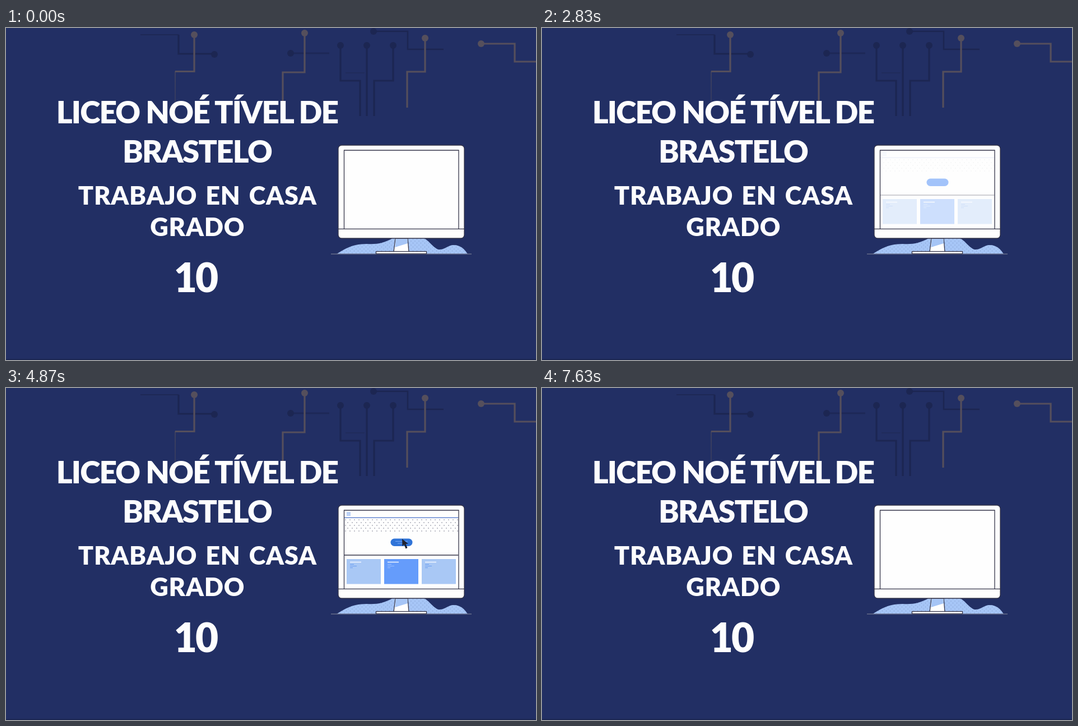
Recreate the animation shown at these times as an HTML page. Size 946x592 px, loop 7.66 s.

```html
<!DOCTYPE html>
<html lang="es">
<head>
<meta charset="utf-8">
<title>Trabajo en casa</title>
<style>
  html, body { margin: 0; width: 100%; height: 100%; overflow: hidden; background: #222f64; }
  svg { display: block; width: 100vw; height: 100vh; }
  text { font-family: Lato, "Open Sans", sans-serif; font-weight: 900; fill: #fdfdfe; text-anchor: middle; }
  .title { font-size: 55px; letter-spacing: -1.8px; }
  .sub { font-size: 45px; letter-spacing: .8px; word-spacing: 4px; }
  .grade { font-size: 71px; letter-spacing: -3px; }
  .gold { stroke: #554f5c; stroke-width: 3.2; fill: none; }
  .dark { stroke: #1c2652; stroke-width: 3.2; fill: none; }
  .ink { stroke: #36364a; stroke-width: 1.3; }
</style>
</head>
<body>
<svg viewBox="0 0 946 592">
  <defs>
    <clipPath id="screen"><rect x="603.6" y="218.6" width="203.8" height="139"/></clipPath>
    <pattern id="heroDots" width="8" height="10" patternUnits="userSpaceOnUse" x="604" y="233">
      <circle cx="2" cy="2" r=".7" fill="#50536a"/><circle cx="6" cy="7" r=".7" fill="#50536a"/>
    </pattern>
    <pattern id="hillDots" width="7" height="7" patternUnits="userSpaceOnUse">
      <circle cx="2" cy="2" r=".6" fill="#6f88b8"/><circle cx="5.5" cy="5.5" r=".6" fill="#6f88b8"/>
    </pattern>
    <linearGradient id="fade" gradientUnits="userSpaceOnUse" x1="0" y1="78" x2="0" y2="150">
      <stop offset="0" stop-color="#554f5c"/><stop offset="1" stop-color="#3d4060"/>
    </linearGradient>
    <path id="hills" d="M590 403C602 396 616 385 644 385C662 386 674 384 692 374H744C755 378 761 391 772 395C783 396 789 387 799 387C812 387 819 395 824 403Z"/>
  </defs>
  <rect width="946" height="592" fill="#222f64"/>
  <rect y="590" width="946" height="2" fill="#1b2652"/>
  <g id="circuit"></g>

  <text class="title" x="341" y="170">LICEO NOÉ TÍVEL DE</text>
  <text class="title" x="341" y="240">BRASTELO</text>
  <text class="sub" x="341.700" y="315">TRABAJO EN CASA</text>
  <text class="sub" x="341.700" y="371">GRADO</text>
  <text class="grade" x="338" y="471">10</text>

  <use href="#hills" fill="#a6c5f6"/>
  <use href="#hills" fill="url(#hillDots)"/>
  <path d="M580 403H831" stroke="#656b88" stroke-width="1.4"/>
  <path class="ink" d="M695 375L692 399H719L717 375Z" fill="#fff"/>
  <path d="M695.500 376H716.500L717 384L694.300 391Z" fill="#a6c5f6"/>
  <rect class="ink" x="660.500" y="398.500" width="90" height="4" fill="#fff"/>
  <rect class="ink" x="593" y="209" width="225" height="166" rx="6" fill="#fefefe"/>

  <g clip-path="url(#screen)">
    <g id="page">
      <g id="header">
        <path d="M608 222H615M608 224.500H615M608 227H615" stroke="#5f92ec" stroke-width="1.2"/>
        <path d="M603 231.300H808" stroke="#6688d2" stroke-width="1.4"/>
        <rect x="604" y="233" width="203" height="25" fill="url(#heroDots)"/>
      </g>
      <g id="body">
        <path class="ink" d="M603 298H808"/>
        <g id="cards"></g>
      </g>
      <g id="button">
        <rect id="pill" x="686.500" y="268.500" width="39" height="13.500" rx="6.700"/>
        <path id="label" d="M695 273.500H717M699 277H713" stroke="#79a8f3" stroke-width="1"/>
      </g>
    </g>
    <path id="cursor" d="M0 0L.5 13L3.500 10L6.500 17.500L9.500 16L6.500 9H11Z" fill="#20222f"/>
  </g>
  <path class="ink" d="M603.500 358V218H808V358M593 358.300H818" fill="none"/>
</svg>
<script>
  const CYCLE = 3830; // the page appears and fades twice per 7660 ms loop
  const $ = id => document.getElementById(id);
  const clamp = v => Math.max(0, Math.min(1, v));
  const span = (t, a, b) => clamp((t - a) / (b - a));
  const ease = p => p < .5 ? 4 * p ** 3 : 1 - 4 * (1 - p) ** 3;
  const mix = (a, b, p) => a + (b - a) * p;

  const trace = (kind, d, extra = '') => `<path class="${kind}" d="${d}" ${extra}/>`;
  const node = (x, y, color) => `<circle cx="${x}" cy="${y}" r="6" fill="${color}"/>`;
  const GOLD = '#554f5c', DARK = '#1c2652';

  $('circuit').innerHTML = [
    trace('dark', 'M240 12H308', 'style="stroke-width:1.5"'),
    trace('dark', 'M308 12V46H372') + node(372, 47, DARK),
    trace('dark', 'M508 45H577', 'opacity=".7"') + node(508, 45, DARK),
    trace('dark', 'M597 31V94H632V157') + node(597, 31, DARK),
    trace('dark', 'M644 31V157') + node(644, 31, DARK),
    trace('dark', 'M691 31V94H657V157') + node(691, 31, DARK),
    trace('dark', 'M606 80H640', 'style="stroke-width:1"'),
    trace('dark', 'M656 6H717V38H781', 'style="stroke-width:2.4"') + node(656, 6, DARK),
    trace('gold', 'M336 12V77.5H302') + node(336, 12, GOLD),
    trace('gold', 'M302 77V142', 'style="stroke:url(#fade);stroke-width:1.5" opacity=".7"'),
    trace('gold', 'M533 9V79H494V150') + node(533, 9, GOLD),
    trace('gold', 'M748 18V78H716V142') + node(748, 18, GOLD),
    trace('gold', 'M848 28H908V60H946') + node(848, 28, GOLD)
  ].join('');

  const card = (x, fill, lines) => `
    <rect x="${x}" y="305" width="61" height="44.5" fill="${fill}"/>
    <path d="M${x + 6} 310.500h20" stroke="#f2f7ff" stroke-width="1.4"/>
    <path d="M${x + 6} 314.500h7M${x + 6} 317.500h12M${x + 6} 320.500h5" stroke="${lines}" stroke-width="1"/>`;
  $('cards').innerHTML = card(608, '#a9c8f5', '#6a9df0')
    + card(675, '#659cfb', '#9cc1ff') + card(742, '#a9c8f5', '#6a9df0');

  function render(time) {
    const t = time % CYCLE;
    const rise = ease(span(t, 0, 595));
    const click = span(t, 1480, 1600);
    const fade = 1 - span(t, 2500, 3250);

    $('page').setAttribute('transform', `translate(0 ${mix(140, 0, rise)})`);
    $('header').setAttribute('opacity', 1 - .9 * span(t, 2400, 2830) - .1 * span(t, 2830, 3200));
    $('body').setAttribute('opacity', fade ** 2);
    $('button').setAttribute('opacity', fade);

    const tone = (a, b) => Math.round(mix(a, b, click));
    $('pill').setAttribute('fill', `rgb(${tone(48, 91)},${tone(116, 150)},${tone(216, 247)})`);
    $('label').setAttribute('opacity', 1 - span(t, 2300, 2550));

    const go = ease(span(t, 250, 900));
    const x = mix(757.5, 707, go) - 1.5 * click;
    const y = mix(297, 269, go);
    $('cursor').setAttribute('transform', `translate(${x} ${y}) rotate(${mix(-57, 0, go)})`);
    $('cursor').setAttribute('opacity', span(t, 220, 390) * (1 - span(t, 2350, 2600)));
  }

  const start = performance.now();
  function frame() {
    render(performance.now() - start);
    requestAnimationFrame(frame);
  }
  frame();
</script>
</body>
</html>
```
